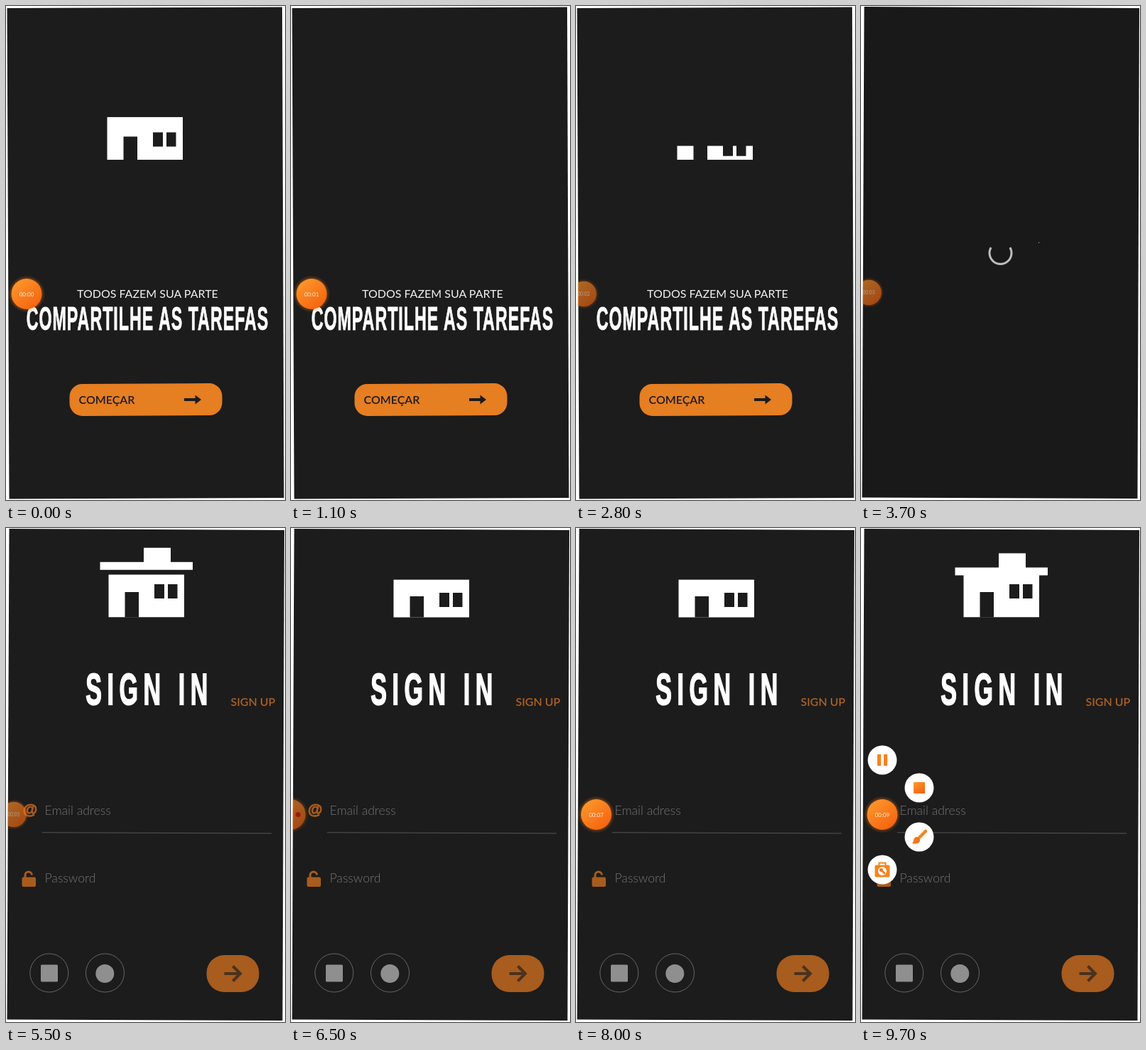
Write an HTML page that moves like this. It is 393 px wide and 694 px high and loops after 9.8 s.

```html
<!DOCTYPE html>
<html lang="pt">
<head>
<meta charset="utf-8">
<title>Tarefas</title>
<style>
html, body { margin: 0; width: 100%; height: 100%; overflow: hidden; background: #fff; }
svg { display: block; width: 100%; height: 100%; }
text { font-family: Lato, sans-serif; }
.head { font: bold 46px "Liberation Sans", Arial, sans-serif; letter-spacing: 2px; fill: #fff; stroke: #fff; stroke-width: 1; text-anchor: middle; }
.sign { font-size: 63px; letter-spacing: 14px; stroke-width: 2; }
.hint { font-size: 17.6px; font-weight: 300; fill: #747474; }
.at { font: bold 21px "Liberation Sans", Arial, sans-serif; text-anchor: middle; }
.time { font-size: 8px; fill: #fff; text-anchor: middle; }
</style>
</head>
<body>
<svg viewBox="0 0 393 694">
  <defs>
    <linearGradient id="glow" x1="0" y1="0" x2=".8" y2="1">
      <stop offset="0" stop-color="#ff9d2e"/>
      <stop offset="1" stop-color="#f4610e"/>
    </linearGradient>
    <clipPath id="ground"><rect x="100" width="200" height="125.5"/></clipPath>
    <clipPath id="edge"><path d="M4 1L392 3L389.5 692L1.5 690.5Z"/></clipPath>
  </defs>

  <path id="stage"/>

  <g id="welcome">
    <text x="100" y="410" font-size="16" fill="#f2f2f2">TODOS FAZEM SUA PARTE</text>
    <text class="head" transform="translate(199.5 454.5) scale(.505 1)">COMPARTILHE AS TAREFAS</text>
    <rect x="89.5" y="530.5" width="215" height="45" rx="18" fill="#e67e22" transform="rotate(-.25 197 553)"/>
    <text x="102.5" y="559" font-size="16" font-weight="600" fill="#1c1c1c">COMEÇAR</text>
    <path d="M251 551h15.5v-4.500l8.500 6.500l-8.500 6.500v-4.500h-15.500z" fill="#1c1c1c"/>
  </g>

  <g id="loader">
    <path id="arc" fill="none" stroke="#bdbdbd" stroke-width="3"/>
    <rect x="250" y="332" width="1" height="1" fill="#ddd"/>
  </g>

  <g id="login">
    <text class="head sign" transform="translate(202 247.5) scale(.54 1)">SIGN IN</text>
    <text x="316.5" y="249.5" font-size="16" font-weight="600" fill="#ad6122">SIGN UP</text>
    <text class="at" x="34" y="402" fill="#a85c1d" stroke="#a85c1d">@</text>
    <text class="hint" x="54.5" y="403">Email adress</text>
    <path d="M51 427.8L374 429" stroke="#565656"/>
    <path d="M27 491v-3.500a4.700 4.500 0 0 1 9.400 0" fill="none" stroke="#a85c1d" stroke-width="3"/>
    <rect x="22.5" y="490.5" width="19.500" height="13.500" rx="2" fill="#a85c1d"/>
    <text class="hint" x="54.5" y="498">Password</text>
    <g fill="none" stroke="#666">
      <circle cx="60.800" cy="625" r="27"/>
      <circle cx="139.500" cy="625" r="27"/>
    </g>
    <rect x="49" y="613.5" width="24" height="24" rx="1.5" fill="#8f8f8f"/>
    <circle cx="139.300" cy="626" r="13" fill="#8f8f8f"/>
    <rect x="282.5" y="600" width="74" height="52" rx="25" fill="#a85c1d"/>
    <path d="M307.500 626h22M319.500 615.500l10.500 10.500l-10.500 10.500" fill="none" stroke="#4a321e" stroke-width="4"/>
  </g>

  <g id="house">
    <g clip-path="url(#ground)">
      <rect id="wall" x="144.5" y="65.5" width="106.5" height="60" fill="#fff"/>
      <rect id="door" x="167.5" y="90" width="19.5" height="36" fill="#1c1c1c"/>
      <path id="panes" d="M209 79h14v20h-14zM228 79h13.500v20h-13.500z" fill="#1c1c1c"/>
      <rect id="roof" x="132.5" y="55.5" width="130.5" height="11" fill="#fff"/>
      <rect id="stack" x="194" y="35.5" width="38" height="20.5" fill="#fff"/>
    </g>
  </g>

  <g clip-path="url(#edge)">
    <g id="bubble">
      <circle r="25.5" fill="#ff7a1a" opacity=".1"/>
      <circle r="23.5" fill="#ff7a1a" opacity=".16"/>
      <circle r="21.5" fill="url(#glow)"/>
      <text id="clock" class="time" y="3"></text>
      <circle id="dot" cx="11" r="3.5" fill="#e01b10"/>
    </g>
  </g>

  <g id="menu">
    <g>
      <circle r="20.5" fill="#fff"/>
      <path d="M-7-8h5.200v16h-5.200zM2-8h5.200v16h-5.200z" fill="#f5841f"/>
    </g>
    <g>
      <circle r="20.5" fill="#fff"/>
      <rect x="-8" y="-8" width="16" height="16" rx="1" fill="url(#glow)"/>
    </g>
    <g>
      <circle r="20.5" fill="#fff"/>
      <path d="M-1 2L9-8" stroke="#f5841f" stroke-width="4.5" stroke-linecap="round"/>
      <path d="M-4 0c3 0 6 3 5 6c-2 4-7 4-11 3c3-2 1-8 6-9z" fill="#f5741f"/>
    </g>
    <g>
      <circle r="20.5" fill="#fff"/>
      <path d="M-4.500-6v-3.500h9v3.500" fill="none" stroke="#f5841f" stroke-width="2"/>
      <rect x="-10.5" y="-6.5" width="21" height="17" rx="2" fill="#f5841f"/>
      <circle cy="2" r="6" fill="#fff"/>
      <path d="M-1 1L3 5" stroke="#f5741f" stroke-width="2.6" stroke-linecap="round"/>
      <circle cx="-1.5" cy=".5" r="2.5" fill="#f5741f"/>
    </g>
  </g>
</svg>

<script>
const LOOP = 9800, LEAVE = 3200, ENTER = 4300, CYCLE = 1500;
const $ = id => document.getElementById(id);
const set = (el, name, value) => el.setAttribute(name, value);
const show = (el, on) => set(el, 'visibility', on ? 'visible' : 'hidden');
const move = (id, x, y) => set($(id), 'transform', `translate(${x} ${y})`);
const ramp = (t, from, span) => Math.min(1, Math.max(0, (t - from) / span));
const mod = (a, b) => (a % b + b) % b;
const out = u => 1 - (1 - u) ** 3;
const back = u => 1 + 2.5 * (u - 1) ** 3 + 1.5 * (u - 1) ** 2;

// Piecewise value from [time, value] points
function track(t, points) {
  let value = points[0][1];
  for (let i = 1; i < points.length; i++) {
    const [a, from] = points[i - 1], [b, to] = points[i];
    if (t >= a) value = from + (to - from) * out(ramp(t, a, b - a));
  }
  return value;
}

const items = [...$('menu').children];
const spots = [[30, 326], [82, 365], [82, 434], [30, 480]];

function drawHouse(t, first) {
  const q = mod(first ? t + 260 : t - 7800, CYCLE);
  const sink = 62 * ramp(q, 740, 220) ** 2;
  const rise = 60 * (1 - ramp(q, 0, 265)) ** 1.5;
  const drop = out(ramp(q, 290, 100));
  const lift = -12 * (1 - drop) - 11.4 * out(ramp(q, 665, 115));

  move('house', first ? -2 : 0, first ? 90.5 : 0);
  move('wall', 0, rise + sink);
  move('door', 0, Math.max(0, 320 - q) * .05 + sink);
  move('panes', 0, Math.max(0, 380 - q) * .0667 + sink);
  move('roof', 0, lift + 82 * ramp(q, 780, 279) ** 2);
  move('stack', 0, lift + 114 * ramp(q, 890, 302) ** 2);
  set($('roof'), 'opacity', drop);
  set($('stack'), 'opacity', drop);
}

function drawLoader(t) {
  const sweep = 240 + 70 * Math.sin((t - 3700) / 210);
  const mid = 90 + (t - 3700) * .27;
  const point = deg => {
    const a = deg * Math.PI / 180;
    return `${196.5 + 15.5 * Math.cos(a)} ${347 + 15.5 * Math.sin(a)}`;
  };
  set($('arc'), 'd', `M${point(mid - sweep / 2)}A15.5 15.5 0 ${sweep > 180 ? 1 : 0} 1 ${point(mid + sweep / 2)}`);
}

function drawBubble(t) {
  const x = track(t, [[1200, 29], [1500, 11], [5700, 11], [5900, -1], [7400, -1], [7700, 28.5], [8300, 28.5], [8500, 30]]);
  const size = track(t, [[1200, 1], [1500, .83], [5700, .83], [5900, 1]]);
  const alpha = track(t, [[1200, 1], [1500, .64], [7400, .64], [7700, 1]]);
  const docked = t >= 5800 && t < 7500;
  set($('bubble'), 'transform', `translate(${x} ${t < LEAVE ? 404.5 : 402.5}) scale(${size})`);
  set($('bubble'), 'opacity', alpha);
  $('clock').textContent = '00:0' + Math.max(0, Math.floor((t - 100) / 1000));
  set($('clock'), 'opacity', docked ? 0 : .85);
  show($('dot'), docked);
}

function drawMenu(t) {
  const u = ramp(t, 8300, 350), k = back(u);
  show($('menu'), u > 0);
  items.forEach((item, i) => {
    const [x, y] = spots[i];
    set(item, 'transform', `translate(${30 + (x - 30) * k} ${403 + (y - 403) * k}) scale(${Math.min(1, Math.max(0, k))})`);
  });
}

function draw(t) {
  const first = t < LEAVE, last = t >= ENTER, busy = !first && !last;
  set($('stage'), 'd', first ? 'M1.5 3L389 1.5L391.5 691L4.5 692.5Z' : 'M4.5 1L392 3L389.5 692L1.5 690.5Z');
  set($('stage'), 'fill', busy ? '#191919' : '#1c1c1c');
  show($('welcome'), first);
  show($('loader'), busy);
  show($('login'), last);
  show($('house'), !busy);
  drawHouse(t, first);
  drawLoader(t);
  drawBubble(t);
  drawMenu(t);
}

const start = performance.now();
function tick() {
  draw((performance.now() - start) % LOOP);
  requestAnimationFrame(tick);
}
tick();
</script>
</body>
</html>
```
